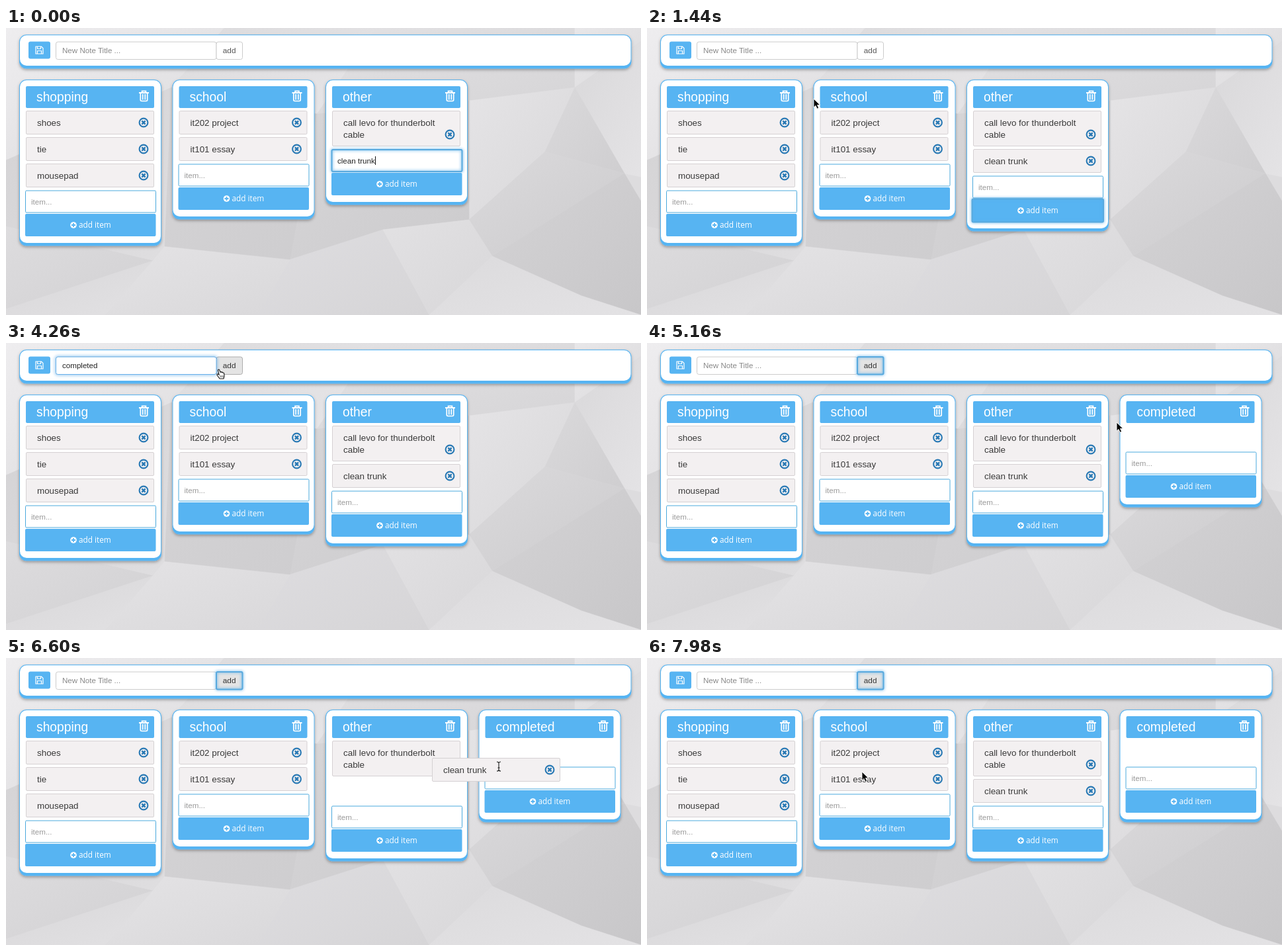
An HTML page for the animation above (8 s loop, 960 by 434 pixels).

```html
<!DOCTYPE html>
<html lang="en">
<head>
<meta charset="utf-8">
<title>Sticky notes board</title>
<style>
  html, body { margin: 0; width: 100%; height: 100%; overflow: hidden; background: #dddcde; }
  svg { display: block; width: 960px; height: 434px; }
  text { font-family: "Liberation Sans", Arial, sans-serif; white-space: pre; }
  .title { font-size: 19.3px; fill: #fff; }
  .item { font-size: 13.4px; fill: #3a3a3a; }
  .field { font-size: 11.6px; fill: #222; }
  .hint { font-size: 11.6px; fill: #999; }
  .button { font: 11.8px "Open Sans", "Noto Sans", sans-serif; fill: #fff; }
</style>
</head>
<body>
<svg viewBox="0 0 960 434">
  <defs>
    <filter id="shadow" x="-10%" y="-10%" width="120%" height="130%">
      <feDropShadow dx="0" dy="2" stdDeviation="2" flood-color="#000" flood-opacity=".32"/>
    </filter>
    <filter id="glow" x="-20%" y="-60%" width="140%" height="220%"><feGaussianBlur stdDeviation="2"/></filter>
  </defs>
  <g id="backdrop"></g>
  <g id="scene"></g>
</svg>
<script>
const LOOP = 8000, STEP = 60;
const BLUE = '#57b4f2', EDGE = '#4aa9dd', INK = '#2a7ab5';
const CLICK_ITEM = 720, FOCUS_TITLE = 2400, CLICK_ADD = 4440;
const DRAG = 6600, OVER = 6720, DROP = 6840, RETURN = 7440;
const LETTERS = [2580, 2820, 2940, 3060, 3180, 3300, 3420, 3540, 3660];
const $ = id => document.getElementById(id);

// Cursor stops: time, x, y, shape used until the next stop
const PATH = [
  [360, 640, 290, 'arrow'], [600, 602, 240, 'hand'], [780, 598, 238, 'beam'],
  [1020, 598, 238, 'arrow'], [1440, 252, 107, 'arrow'], [1560, 252, 107, 'arrow'],
  [1800, 242, 137, 'arrow'], [1860, 242, 137, 'arrow'], [2160, 115, 39, 'beam'],
  [2520, 115, 39, ''], [3720, 140, 40, 'beam'], [4140, 317, 42, 'hand'],
  [4260, 324, 46, 'hand'], [4500, 324, 46, 'arrow'], [5160, 710, 120, 'arrow'],
  [5460, 786, 150, 'arrow'], [5880, 560, 200, 'beam'], [6180, 594, 196, 'beam'],
  [6540, 594, 196, 'beam'], [6600, 745, 164, 'beam'], [6720, 775, 155, 'beam'],
  [6840, 788, 150, 'beam'], [7440, 788, 150, 'arrow'], [7620, 788, 150, 'arrow'],
  [7980, 325, 172, 'arrow']
];

const FACETS = [
  ['#eeedef', '#dcdbdd', '0,0 330,0 250,90 0,200'],
  ['#dcdbdd', '#e7e6e8', '330,0 560,0 470,130 250,90'],
  ['#e3e2e4', '#d5d4d6', '560,0 860,0 860,90 700,110 470,130'],
  ['#e8e7e9', '#dcdbdd', '860,0 960,0 960,20 860,90'],
  ['#d9d8da', '#e4e3e5', '860,90 960,20 960,225 935,220'],
  ['#e5e4e6', '#d8d7d9', '700,110 860,90 815,187 700,290'],
  ['#dad9db', '#cfced0', '860,90 935,220 815,187'],
  ['#dbdadc', '#cccbcd', '815,187 935,220 735,345 700,290'],
  ['#d4d3d5', '#c8c7c9', '935,220 960,262 960,434 870,405 735,345'],
  ['#d3d2d4', '#dfdee0', '0,200 250,90 240,330 222,352 0,300'],
  ['#dddcde', '#d2d1d3', '0,300 222,352 0,425'],
  ['#d8d7d9', '#e2e1e3', '0,425 222,352 150,434 0,434'],
  ['#e4e3e5', '#d9d8da', '222,352 240,330 430,350 380,434 150,434'],
  ['#d5d4d6', '#cecdcf', '250,90 470,130 430,350 240,330'],
  ['#d7d6d8', '#cccbcd', '470,130 700,110 700,290 570,305 430,350'],
  ['#dedde0', '#d6d5d7', '430,350 570,305 640,434 380,434'],
  ['#e2e1e3', '#d8d7d9', '570,305 700,290 735,345 640,434'],
  ['#dcdbdd', '#e3e2e4', '735,345 870,405 960,434 640,434']
];

$('backdrop').innerHTML = FACETS.map(([from, to, points], i) =>
  `<linearGradient id="tone${i}" x2="1" y2="1"><stop stop-color="${from}"/><stop offset="1" stop-color="${to}"/></linearGradient>
   <polygon points="${points}" fill="url(#tone${i})" stroke="url(#tone${i})" stroke-width=".6"/>`).join('');

const rect = (x, y, w, h, r, fill, extra = '') =>
  `<rect x="${x}" y="${y}" width="${w}" height="${h}" rx="${r}" fill="${fill}" ${extra}/>`;
const text = (x, y, style, value, extra = '') => `<text x="${x}" y="${y}" class="${style}" ${extra}>${value}</text>`;
const line = (d, color, width, extra = '') =>
  `<path d="${d}" fill="none" stroke="${color}" stroke-width="${width}" ${extra}/>`;
const at = (x, y, body) => `<g transform="translate(${x} ${y})">${body}</g>`;

const pen = document.createElement('canvas').getContext('2d');
pen.font = '11.6px "Liberation Sans", Arial, sans-serif';
const caret = (x, y, value) => rect(x + pen.measureText(value).width + .3, y, 1, 13, 0, '#111');

const panel = (x, y, w, h) =>
  rect(x, y, w, h, 11, BLUE, 'filter="url(#shadow)"') + rect(x + 1, y + 1, w - 2, h - 5.5, 10, '#fff');

const ring = (x, y, w, h) =>
  rect(x, y, w, h, 2, 'none', 'stroke="#5aaeea" stroke-width="3" opacity=".8" filter="url(#glow)"') +
  rect(x, y, w, h, 2, 'none', 'stroke="#58a9de" stroke-width="2"');

const trash = (x, y) => at(x, y,
  line('M-7.5-5H7.5M-2.8-5V-7.6H2.8V-5', '#fff', 1.9) +
  line('M-5.2-4V5.6Q-5.2 7.5-3.4 7.5H3.4Q5.2 7.5 5.2 5.6V-4M-1.8-3V5.5M1.8-3V5.5', '#fff', 1.7));

const remove = (x, y) => at(x, y,
  `<circle r="6.4" fill="none" stroke="${INK}" stroke-width="2.1"/>` + line('M-2.6-2.6 2.6 2.6M2.6-2.6-2.6 2.6', INK, 2.5));

const itemHeight = lines => 18 + 18 * lines.length;

function item(x, y, lines) {
  const h = itemHeight(lines);
  return rect(x + .5, y + .5, 193, h - 1, 1.5, '#f3f0f1', 'stroke="#d5d1d3"') +
    lines.map((value, i) => text(x + 17, y + 22.8 + 18 * i, 'item', value)).join('') +
    remove(x + 178, y + h - 18);
}

function note(index, title, items, { value = '', inputFocus, showCaret, buttonFocus } = {}) {
  const x = 20 + 231.5 * index;
  let y = 125, body = '';
  for (const entry of items) {
    if (!entry.hidden) body += item(x + 10, y, entry.lines);
    y += itemHeight(entry.lines) + 4;
  }
  y = Math.max(y, 164);
  const cy = y + 53;
  return panel(x, 78, 215, y + 6.5) +
    rect(x + 10, 88, 194, 33, 2, BLUE) + text(x + 26, 111.3, 'title', title) + trash(x + 188.5, 103) + body +
    rect(x + 9.5, y + 1, 197, 33, 1.5, '#fff', `stroke="${EDGE}"`) +
    (inputFocus ? ring(x + 9.5, y + 1, 197, 33) : '') +
    text(x + 18, y + 21.7, value ? 'field' : 'hint', value || 'item...') +
    (showCaret ? caret(x + 18, y + 11, value) : '') +
    rect(x + 9, y + 36, 197.5, 34, 2, BLUE) +
    (buttonFocus ? ring(x + 8.5, y + 35.5, 198.5, 35) : '') +
    at(x + 82, cy, '<circle r="4.8" fill="#fff"/>' + line('M-3 0H3M0-3V3', BLUE, 1.8)) +
    text(x + 90, cy + 4.2, 'button', 'add item');
}

function header({ value, focused, showCaret, hover, pressed }) {
  const active = hover || pressed;
  return panel(20, 10, 925.5, 51.5) +
    rect(34, 20.5, 33, 26, 3, BLUE) +
    at(50.5, 33.5, line('M-5.5-5.5H3L5.5-3V5.5H-5.5ZM-3 5V1H3V5M-3-5V-2H2V-5', '#fff', 1.2)) +
    rect(75.5, 21, 242.5, 26.5, 3, '#fff', 'stroke="#ccc"') +
    rect(318, 21, 39.5, 26.5, 3, active ? '#e4e4e4' : '#fff', `stroke="${active ? '#adadad' : '#ccc'}"`) +
    text(327.8, 38, 'field', 'add', `style="font-size:11.8px;fill:${active ? '#333' : '#555'}"`) +
    (pressed ? ring(318, 21, 39.5, 26.5) : '') +
    (focused ? rect(75.5, 21, 242.5, 26.5, 3, 'none', 'stroke="#66afe9" stroke-width="4" opacity=".6" filter="url(#glow)"') +
      rect(75.5, 21, 242.5, 26.5, 3, '#fff', 'stroke="#66afe9"') : '') +
    text(85, 38.2, value ? 'field' : 'hint', value || 'New Note Title ...', value ? '' : 'style="fill:#888"') +
    (showCaret ? caret(85, 27.5, value) : '');
}

const CURSORS = {
  arrow: '<path d="M0 0V13L3-.0 3 10.3 5.2 15 7.6 14 5.4 9.4H9.6Z" fill="none"/>' +
    '<path d="M0 0V13.2L3 10.4 5.1 15.2 7.6 14.1 5.5 9.5H9.7Z" fill="#000" stroke="#fff" stroke-width=".9"/>',
  beam: line('M-3-7Q0-7 0-5Q0-7 3-7M0-5V5M-3 7Q0 7 0 5Q0 7 3 7M-1.5 2H1.5', '#fff', 2.4, 'opacity=".7"') +
    line('M-3-7Q0-7 0-5Q0-7 3-7M0-5V5M-3 7Q0 7 0 5Q0 7 3 7M-1.5 2H1.5', '#111', 1.1),
  hand: '<path d="M-3.6-5.2Q-2.2-6.8-1.2-5L.1-1.9Q1.2-3.2 2-1.6Q3.3-2.5 3.9-.9Q5.4-1.4 5.7.3L6 4 5 8H-.9L-4.9 2.6Q-5.4.6-3.4 1.1L-1.9 2Z" fill="#fff" stroke="#111" stroke-width="1.1"/>' +
    line('M0 3V6M2 3V6M4 3V6', '#222', .7)
};

function pointer(t) {
  const i = PATH.findLastIndex(stop => stop[0] <= t);
  if (i < 0) return { shape: '' };
  const [start, x, y, shape] = PATH[i];
  const [end, nx, ny] = PATH[i + 1] || PATH[i];
  const p = end > start ? (t - start) / (end - start) : 0;
  const k = p * p * (3 - 2 * p);
  return { x: x + (nx - x) * k, y: y + (ny - y) * k, shape };
}

const blink = (t, since) => (t - since) % 1000 < 500;

function scene(t) {
  const mouse = pointer(t);
  const typed = LETTERS.filter(time => time <= t);
  const focused = t >= FOCUS_TITLE && t < CLICK_ADD;
  const added = t >= CLICK_ADD;
  const entering = t < CLICK_ITEM;
  const dragging = t >= DRAG && t < DROP;
  const moved = t >= OVER && t < RETURN;
  const chore = { lines: ['clean trunk'], hidden: dragging };
  const list = values => values.map(value => ({ lines: [value] }));

  const call = { lines: ['call levo for thunderbolt', 'cable'] };
  const other = entering || moved ? [call] : [call, chore];
  let out = header({
    value: focused ? 'completed'.slice(0, typed.length) : '',
    focused,
    showCaret: focused && blink(t, typed.at(-1) || FOCUS_TITLE),
    hover: mouse.shape === 'hand' && mouse.y < 60,
    pressed: added
  });
  out += note(0, 'shopping', list(['shoes', 'tie', 'mousepad']));
  out += note(1, 'school', list(['it202 project', 'it101 essay']));
  out += note(2, 'other', other, {
    value: entering ? 'clean trunk' : '',
    inputFocus: entering,
    showCaret: entering && blink(t, 0),
    buttonFocus: !entering && t < FOCUS_TITLE
  });
  if (added) out += note(3, 'completed', moved ? [chore] : []);
  if (dragging) out += t < OVER ? item(644, 151, chore.lines) : item(690, 137, chore.lines);
  if (mouse.shape) out += at(mouse.x, mouse.y, CURSORS[mouse.shape]);
  return out;
}

let shown = -1;
const origin = performance.now();
function tick() {
  const now = (performance.now() - origin) % LOOP;
  const t = Math.floor(now / STEP) * STEP;
  if (t !== shown) $('scene').innerHTML = scene(shown = t);
  requestAnimationFrame(tick);
}
tick();
</script>
</body>
</html>
```
